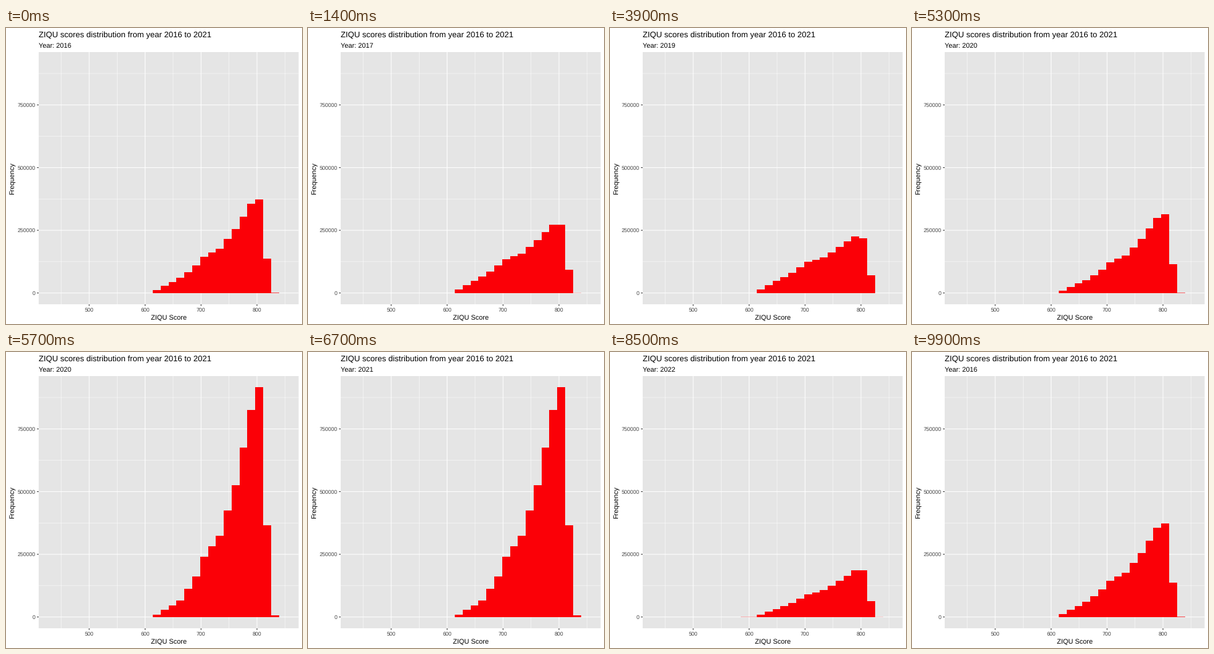
Write a matplotlib script that moves like this. It is 480x480 px and loops after 10000 ms.

```python
import numpy as np
import matplotlib.pyplot as plt
from matplotlib.animation import FuncAnimation
from matplotlib.patches import Rectangle

SIZE, DPI = 480, 80
PT = 72 / DPI  # points per pixel
STEP_MS, LOOP_MS = 100, 10000
LEFT, RIGHT, TOP, BOTTOM = 53, 474.5, 39, 448
BASE = 430
RED = "#fb0007"
YEARS = [*range(2016, 2023), 2016]
LABEL_TIMES = [900, 2400, 3900, 5300, 6700, 8100, 9500]
BAR_TIMES = [1400, 2900, 4400, 5700, 7100, 8500, 9900]

# Every histogram blends a broad and a peaked profile, in pixels per bin.
BINS = np.arange(-2, 16)
BROAD = np.interp(BINS, [-1, 0, 4, 6, 8, 12, 13, 14, 15],
                  [0, 6, 33, 51, 58, 92, 89, 29, 0])
PEAKED = np.interp(BINS, [-1, 0, 3, 5, 6, 8, 10, 12, 13, 14, 15],
                   [0, 4, 27, 66, 98, 132, 214, 336, 373, 149, 3])
TAIL = BINS < 0
# Weights of the broad profile, the peaked profile and the low tail.
BLEND = {
    2016: (0.70, 0.24, 0),
    2017: (0.95, 0.07, 0),
    2018: (1.00, 0.00, 0),
    2019: (0.60, 0.20, 0),
    2020: (0.00, 1.00, 0),
    2021: (0.45, 0.74, 0.2),
    2022: (0.63, 0.053, 0.3),
}
EDGES = np.round(238 + 12.79 * np.arange(-2, 17))

plt.rcParams.update({"font.family": "Liberation Sans", "text.hinting": "none"})
fig = plt.figure(figsize=(SIZE / DPI, SIZE / DPI), dpi=DPI, facecolor="white")
ax = fig.add_axes([0, 0, 1, 1])
ax.set(xlim=(0, SIZE), ylim=(SIZE, 0))
ax.axis("off")


def score_x(score):
    return 225.6 + 0.907 * (score - 600)


def count_y(count):
    return 429.7 - 101.65 * count / 250000


def line(xs, ys, width, color="white"):
    ax.plot(xs, ys, color=color, lw=width * PT, zorder=1,
            solid_capstyle="butt", snap=False)


def text(x, y, label, size=11, color="black", **kwargs):
    return ax.text(x, y, label, fontsize=size * PT, color=color,
                   va="baseline", **kwargs)


def block(x, y, width, height, color, z):
    return ax.add_patch(Rectangle((x, y), width, height, facecolor=color,
                                  lw=0, snap=False, zorder=z))


block(LEFT, TOP, RIGHT - LEFT, BOTTOM - TOP, "#e5e5e5", 0)

for score in range(450, 851, 50):
    x, major = score_x(score), score % 100 == 0
    line([x, x], [TOP, BOTTOM], 1.07 if major else 0.53)
    if major:
        line([x, x], [BOTTOM, BOTTOM + 2.75], 1.07, "#333333")
        text(x, 460, str(score), 8.8, "#444444", ha="center")

for count in range(0, 875001, 125000):
    y, major = count_y(count), count % 250000 == 0
    line([LEFT, RIGHT], [y, y], 1.07 if major else 0.53)
    if major:
        line([LEFT - 2.75, LEFT], [y, y], 1.07, "#333333")
        text(48, y + 3.2, str(count), 8.8, "#444444", ha="right")

text(LEFT, 15, "ZIQU scores distribution from year 2016 to 2021", 13.15)
year_label = text(LEFT, 32, "")
text((LEFT + RIGHT) / 2, 473, "ZIQU Score", ha="center")
text(13, (TOP + BOTTOM) / 2, "Frequency", ha="center", rotation=90,
     rotation_mode="anchor")

bars = [block(a, BASE, b - a, 0, RED, 3) for a, b in zip(EDGES, EDGES[1:])]


def year_at(times, now):
    return YEARS[np.searchsorted(times, now, side="right")]


def bar_heights(year):
    broad, peaked, tail = BLEND[year]
    return broad * BROAD + peaked * PEAKED + tail * TAIL


def update(frame):
    now = frame * STEP_MS
    year_label.set_text(f"Year: {year_at(LABEL_TIMES, now)}")
    for bar, height in zip(bars, bar_heights(year_at(BAR_TIMES, now))):
        # Bins under one pixel show as a translucent hairline.
        pixels = max(round(height), 1)
        bar.set_y(BASE - pixels)
        bar.set_height(pixels)
        bar.set_alpha(min(height, 1))
    return [year_label, *bars]


animation = FuncAnimation(fig, update, frames=LOOP_MS // STEP_MS,
                          interval=STEP_MS, repeat=True, repeat_delay=0)
plt.show()
```
